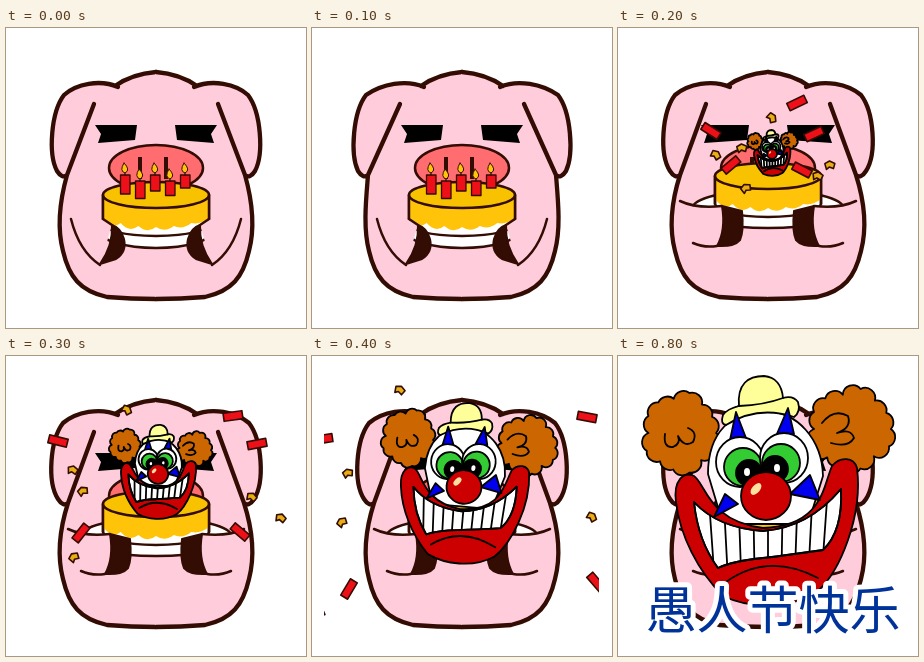
An HTML page that plays this animation: 300 by 300 pixels, repeating every 1 s.

```html
<!DOCTYPE html>
<html lang="zh">
<head>
<meta charset="utf-8">
<title>愚人节快乐</title>
<style>
html, body { margin: 0; width: 100%; height: 100%; overflow: hidden; background: #fff; }
svg { display: block; width: 100vw; height: 100vh; }
.pig { stroke: #330c04; stroke-width: 4.3; stroke-linecap: round; stroke-linejoin: round; fill: none; }
.pink { fill: #ffccdb; stroke: none; }
.hoof { fill: #330c04; stroke-width: 2; }
.thin { stroke-width: 2.5; }
.flat { stroke: none; }
.clown { stroke: #000; stroke-width: 1.8; stroke-linecap: round; stroke-linejoin: round; fill: none; }
.clown * { vector-effect: non-scaling-stroke; }
.bit { stroke: #330c04; stroke-width: 1.6; stroke-linejoin: round; }
.wish {
  font: 500 51px "Noto Sans CJK SC", "Noto Sans CJK", sans-serif;
  fill: #003399; stroke: #fff; stroke-width: 10; stroke-linejoin: round; paint-order: stroke;
}
</style>
</head>
<body>
<svg id="stage" viewBox="0 0 300 300"></svg>
<script>
const STEP = 100, LOOP = 1000;

const group = (cls, body, transform = '') => `<g class="${cls}" transform="${transform}">${body}</g>`;
const path = (d, attrs = '') => `<path d="${d}" ${attrs}/>`;
const oval = (x, y, rx, ry, attrs = '') => `<ellipse cx="${x}" cy="${y}" rx="${rx}" ry="${ry}" ${attrs}/>`;
const mirror = body => body + group('', body, 'matrix(-1 0 0 1 300 0)');
const fill = c => `fill="${c}"`;
const range = n => [...Array(n).keys()];

// ---- pig: left half, mirrored ----
// edge: outermost x of the ear, tip: x of its lower end, brow: outer x of the eye
function pig(edge, tip, brow = 89) {
  const ear = `M112 59C94 51 70 56 ${edge + 12} 67C${edge - 1} 84 ${edge - 4} 126 ${tip - 10} 143Q${tip - 5} 151 ${tip} 147`;
  const side = `M${tip} 147C54 172 51 200 57 223C63 249 74 263 101 269Q125 271 150 271`;
  const crown = 'M109 58Q126 46 150 44';
  const half =
    path(`${ear}L88 76Z`, 'class="pink"') +
    path(`${side}L151 271V44H150Q126 46 109 58L88 76Z`, 'class="pink"') +
    path(`${ear}${side}${crown}M88 76L${tip} 147`);
  const eye = path(`M${brow} 97H131L129 112L${brow + 3} 115L${brow + 6} 106Z`, 'class="flat" fill="#000"');
  return group('pig',
    mirror(half) +
    oval(150, 140, 47, 23, 'class="thin" fill="#ff6d70"') +
    path('M134 129V151M160 129V151', 'stroke-width="4" stroke-linecap="butt"') +
    mirror(eye));
}

function cake(y) {
  const scallops = range(6).map(i => `q9 ${12 - 2 * i} 17.67 ${5 - 2 * i}`).join('');
  return path(`M97 ${y}V${y + 28}Q100 ${y + 40} 150 ${y + 41}Q200 ${y + 40} 203 ${y + 28}V${y}Z`, 'class="thin" fill="#fff"') +
    path(`M97 ${y + 23}${scallops}V${y}H97Z`, 'class="flat" fill="#ffc40a"') +
    path(`M97 ${y}V${y + 28}M203 ${y}V${y + 28}`, 'class="thin"') +
    oval(150, y, 53, 13, 'class="thin" fill="#f8c200"');
}

function candle(i) {
  const x = 119 + 15 * i, y = 147 + i % 2 * 6;
  return `<rect x="${x - 4.5}" y="${y}" width="9.5" height="${19 - i * 1.5}" fill="#ed1018" stroke-width="1.3"/>` +
    path(`M${x} ${y}v-4`, 'stroke-width="1.2"') +
    path(`M${x - 1} ${y - 12}q7 7 1 10q-6 -2 -1 -10`, 'fill="#ffc40a" stroke-width="1"');
}

const holding = group('pig',
  oval(150, 203, 56, 17, 'class="thin" fill="#fff"') +
  cake(167) + [0, 2, 4, 1, 3].map(candle).join('') +
  mirror(
    path('M65 191L90 190Q100 192 106 197L94 237Q73 223 65 191Z', 'class="pink"') +
    path('M106 197Q115 200 118 211Q121 224 110 231L94 236Q107 218 106 197Z', 'class="hoof"') +
    path('M65 191Q73 223 94 237M106 197L97 191', 'class="thin"')));

const flinching = group('pig',
  oval(150, 181, 76, 19, 'class="thin" fill="#fff"') +
  cake(148) +
  mirror(
    path('M62 173Q80 182 104 178L122 184V212L99 218Q78 216 62 200Z', 'class="pink"') +
    path('M104 178L124 183Q126 203 122 212Q116 219 99 218Q108 202 104 178Z', 'class="hoof"') +
    path('M62 173Q79 181 104 178M75 215Q86 220 99 218', 'class="thin"')));

// ---- clown ----
function puff(cx, cy, rx, ry) {
  const n = 14;
  const points = range(n).map(i => {
    const a = i / n * 2 * Math.PI, r = .95 + .08 * Math.sin(i * 2.4);
    return `${cx + rx * r * Math.cos(a)} ${cy + ry * r * Math.sin(a)}`;
  });
  return path(`M${points.join('A10 10 0 0 1 ')}A10 10 0 0 1 ${points[0]}`, fill('#cc6600'));
}

const hair =
  puff(63, 77, 37, 40) + path('M47 78Q45 92 55 91Q63 88 60 80Q66 92 75 86Q80 76 70 72') +
  puff(233, 73, 42, 40) + path('M204 67Q216 52 230 60Q234 72 219 77Q233 72 236 82Q230 92 213 87');

function eye(x, y, inward) {
  return oval(x, y, 24, 25, fill('#fff')) + oval(x + 3 * inward, y + 5, 19, 19, fill('#33cc33')) +
    oval(x + 9 * inward, y + 11, 13, 13, fill('#000')) + oval(x + 7 * inward, y + 10, 3, 4, 'fill="#fff" stroke="none"');
}

const TEETH = 'M76 146Q100 172 145 175Q190 172 223 133Q225 175 205 194Q170 199 145 202Q115 205 100 212Q80 185 76 146Z';
const gaps = range(9).map(i => `M${90 + i * 15} 130l${(4 - i) * 1.5} 85`).join('');

const face =
  path('M90 118C90 76 114 55 146 55C180 55 204 84 205 120L190 168H105Z', fill('#fff')) +
  path('M121 50C119 28 130 20 146 20C158 21 164 30 165 42Q175 39 180 46Q183 56 176 61Q140 49 108 69Q102 68 105 59Q109 53 121 50Z', fill('#ffff99')) +
  path('M121 50Q146 49 165 42') +
  path('M112 84L118 56L128 82ZM158 80L170 52L176 78Z', fill('#0000ee')) +
  eye(122, 106, 1) + eye(166, 102, -1) +
  path('M58 146C55 124 66 115 76 120C88 128 90 165 145 172C205 170 205 130 214 110C222 100 236 101 239 112C245 160 222 215 200 235C170 255 130 252 105 240C80 215 62 180 58 146Z', fill('#cc0000')) +
  path('M96 161L107 138L120 148ZM172 138L192 119L202 144Z', fill('#0000ee')) +
  path(TEETH, fill('#fff')) + path(gaps, 'clip-path="url(#teeth)"') + path(TEETH) +
  path('M108 226Q150 196 200 222') +
  oval(148, 140, 25, 24, fill('#cc0000')) +
  oval(138, 133, 4, 7, 'fill="#ffe0a0" stroke="none" transform="rotate(40 138 133)"');

const clown = (x, y, scale, turn) =>
  group('clown', hair + face, `translate(${x} ${y}) rotate(${turn}) scale(${scale}) translate(-148 -140)`);

// ---- confetti: [x, y, vx, vy], thrown out and pulled down, lying along its flight ----
const GRAVITY = 8;
const REDS = [[93, 103, -41, -26], [179, 75, 48, -23], [113, 137, -38, 32], [184, 142, 50, 26], [196, 106, 55, -26]];
const GOLDS = [[154, 90, -33, -44], [98, 127, -31, -21], [124, 120, -47, 7], [212, 137, 34, -4], [200, 148, 75, 6], [128, 160, -60, 33]];
const STRIP = path('M-9.5 -4H9.5V4H-9.5Z', fill('#ed1018'));
const FLAKE = path('M-5 -2L0 -4L5 -1L3 4L-1 2L-4 4Z', fill('#e9ae12'));

function confetti(k) {
  const throwBits = (bits, shape) => bits.map(([x, y, vx, vy]) => {
    const slope = Math.atan((vy + 2 * GRAVITY * k) / vx) * 180 / Math.PI;
    return group('bit', shape, `translate(${x + vx * k} ${y + vy * k + GRAVITY * k * k}) rotate(${slope})`);
  }).join('');
  return throwBits(GOLDS, FLAKE) + throwBits(REDS, STRIP);
}

const startled = pig(45, 62) + flinching;
const scenes = [
  pig(46, 61) + holding,
  pig(42, 56) + holding,
  pig(45, 62, 83) + flinching + clown(154, 126, .2, 0) + confetti(0),
  startled + clown(152, 118, .41, 4) + confetti(1),
  startled + clown(152, 131, .7, 5) + confetti(2),
  startled + clown(148, 140, 1, 0) + '<text class="wish" x="155" y="273" text-anchor="middle">愚人节快乐</text>'
];

const stage = document.getElementById('stage');
stage.innerHTML =
  `<defs><clipPath id="teeth">${path(TEETH)}</clipPath>` +
  '<clipPath id="view"><rect x="12" y="19" width="275" height="260"/></clipPath></defs>' +
  scenes.map(s => `<g class="scene" clip-path="url(#view)" display="none">${s}</g>`).join('');

const layers = [...stage.querySelectorAll('.scene')];
const start = performance.now();

function draw() {
  const time = (performance.now() - start) % LOOP;
  const current = Math.min(layers.length - 1, Math.floor(time / STEP));
  layers.forEach((layer, i) => layer.setAttribute('display', i === current ? 'inline' : 'none'));
  requestAnimationFrame(draw);
}
draw();
</script>
</body>
</html>
```
